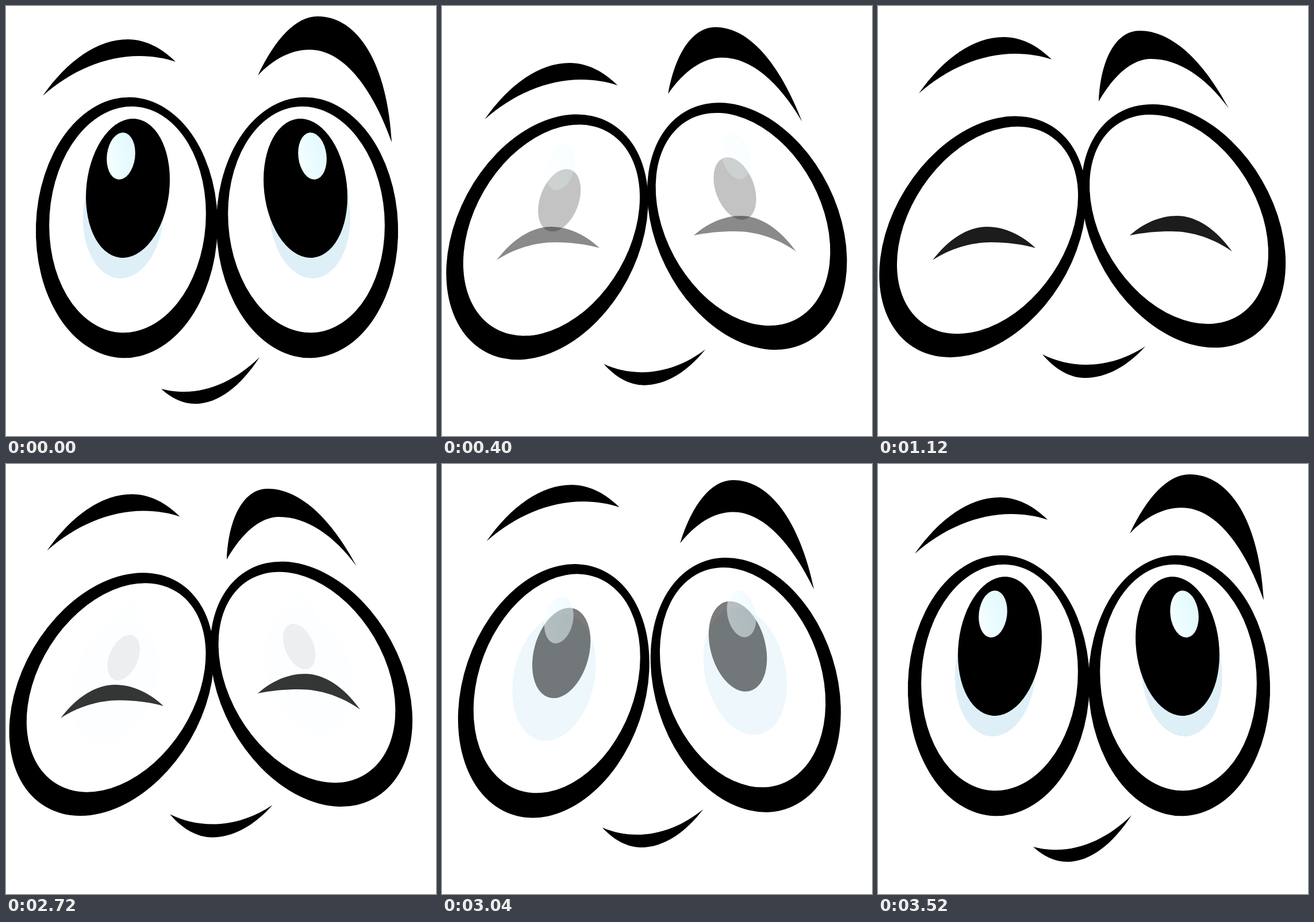
Recreate the animation shown at these times as an HTML page with a canvas. Size 748 px wide and 748 px high, loop 4 s.

```html
<!DOCTYPE html>
<html lang="en">
<head>
<meta charset="utf-8">
<title>Cartoon face</title>
<style>
  html, body { margin: 0; width: 100%; height: 100%; overflow: hidden; background: #fff; }
  canvas { display: block; width: 748px; height: 748px; }
</style>
</head>
<body>
<canvas id="stage" width="748" height="748"></canvas>
<script>
const ctx = document.getElementById('stage').getContext('2d');
const LOOP = 4000, STEP = 80, REOPEN = 33;
const rad = deg => deg * Math.PI / 180;
const clamp = u => Math.min(1, Math.max(0, u));
const mixAll = (a, b, t) => a.map((v, i) => v + (b[i] - v) * t);
const at = ([x, y, dx, dy], t) => [x + dx * t, y + dy * t];

// Gentle ease: halfway between linear and a sine curve.
function ease(u) {
  u = clamp(u);
  return (u + (1 - Math.cos(Math.PI * u)) / 2) / 2;
}

// Rises to 1 over `close` steps, later falls back over `open` steps.
const blink = (step, close, open, delay = 0) =>
  step < REOPEN ? ease(step / close) : 1 - ease((step - REOPEN - delay) / open);

// Crescents: left tip, upper or outer peak, right tip, inner peak.
const leftBrow = [64, 156, 212, 58, 295, 97, 232, 87];
const browHigh = [438, 121, 542, 18, 671, 237, 528, 76];
const browMid = [393, 153, 475, 37, 626, 201, 487, 90];
const browLow = [384, 166, 455, 43, 610, 178, 475, 92];
const smirk = [270, 666, 329, 692, 441, 611, 310, 671];
const smile = [286, 606, 360, 647, 465, 592, 362, 624];
const lids = [
  [95, 442, 190, 384, 274, 421, 197, 411],
  [438, 399, 520, 365, 616, 427, 510, 392]
];

// Each position is [x, y, dx, dy]: open place, then the shift when closed.
const eyes = [
  { side: 1, turn: 30, ball: [211.5, 371.5, -21, 18.5], pupil: [212, 317, -7.8, 21],
    iris: [204, 362, -16, 17], shine: [200, 261, 6, 19] },
  { side: -1, turn: 28, ball: [522.5, 371.5, 1, -.5], pupil: [521, 317, -11.5, .5],
    iris: [528.5, 362, -2, -2], shine: [533, 261, -21.5, 0] }
];

// Handles between a tip and a level peak; steep arcs become rounder.
function handles(tx, ty, px, py) {
  const dx = px - tx, dy = py - ty;
  const steep = Math.max(0, Math.abs(dy / dx) - 1);
  return [tx + dx * (.29 - .33 * steep), ty + dy * .62, px - dx * (.36 + .27 * steep), py];
}

function crescent([ax, ay, px, py, bx, by, qx, qy]) {
  ctx.beginPath();
  ctx.moveTo(ax, ay);
  for (const [x, y, fromX, fromY, toX, toY] of [[px, py, ax, ay, bx, by], [qx, qy, bx, by, ax, ay]]) {
    const [a, b, c, d] = handles(fromX, fromY, x, y);
    const [e, f, g, h] = handles(toX, toY, x, y);
    ctx.bezierCurveTo(a, b, c, d, x, y);
    ctx.bezierCurveTo(g, h, e, f, toX, toY);
  }
  ctx.fill();
}

function oval([x, y], rx, ry, deg, fill) {
  ctx.fillStyle = fill;
  ctx.beginPath();
  ctx.ellipse(x, y, rx, ry, rad(deg), 0, 2 * Math.PI);
  ctx.fill();
}

function drawRim({ side, turn, ball }, drift, tilt) {
  const a = rad(side * turn * tilt), ox = -1.5 * side, oy = 14;
  const [x, y] = at(ball, drift);
  const center = [x + ox * Math.cos(a) - oy * Math.sin(a), y + ox * Math.sin(a) + oy * Math.cos(a)];
  oval(center, 158, 226.8, side * (2 + turn * tilt), '#000');
}

function drawEye({ side, turn, ball, iris, pupil, shine }, drift, tilt, shut) {
  const size = 1 - .7 * shut;
  oval(at(ball, drift), 136, 197, side * (3.9 + turn * tilt), '#fff');
  ctx.globalAlpha = 1 - Math.max(shut, drift === 1 ? 1 : 0);
  oval(at(iris, drift), 70, 112, side * (4 + 16 * tilt), '#deeff8');
  ctx.globalAlpha = 1 - shut;
  oval(at(pupil, drift), 72.1 * size, 121.5 * size, side * (6.6 + 18 * shut), '#000');
  const [x, y] = at(shine, drift);
  const glow = ctx.createLinearGradient(x - 25, y + 6, x + 25, y - 6);
  glow.addColorStop(0, '#f6ffff');
  glow.addColorStop(.5, '#e9fcff');
  glow.addColorStop(1, '#e4f7fb');
  oval([x, y], 24.5, 41, side * (7 + 9 * tilt), glow);
  ctx.globalAlpha = 1;
}

// The left brow dips while closing and hops while opening.
function leftBrowShift(step) {
  if (step < REOPEN) {
    const u = clamp(step / 14), dip = Math.sin(Math.PI * u);
    return [7 * ease(u) + 9 * dip, -4 * ease(u) + 47 * dip];
  }
  const u = clamp((step - REOPEN) / 11), hop = Math.sin(Math.PI * u ** 1.6);
  return [7 * (1 - ease(u)) + 12.4 * hop, -4 * (1 - ease(u)) - 25 * hop];
}

function draw(step) {
  const drift = blink(step, 5, 11), tilt = blink(step, 6.1, 11);
  const shut = blink(step, 7, 9.75), drop = blink(step, 7, 7, 1);
  const lid = step < REOPEN ? (step - 2) / 5.8 : (38 - step) / 4.5;
  ctx.fillStyle = '#fff';
  ctx.fillRect(0, 0, 748, 748);

  eyes.forEach(e => drawRim(e, drift, tilt));
  eyes.forEach(e => drawEye(e, drift, tilt, shut));

  ctx.fillStyle = '#000';
  ctx.globalAlpha = .89 * clamp(lid);
  lids.forEach(crescent);
  ctx.globalAlpha = 1;

  const [dx, dy] = leftBrowShift(step), mid = .77;
  crescent(leftBrow.map((v, i) => v + (i % 2 ? dy : dx)));
  crescent(drop < mid ? mixAll(browHigh, browMid, drop / mid)
                      : mixAll(browMid, browLow, (drop - mid) / (1 - mid)));
  crescent(mixAll(smirk, smile, blink(step, 7.4, 11)));
}

const start = performance.now();
function tick() {
  draw(Math.floor(((performance.now() - start) % LOOP) / STEP));
  requestAnimationFrame(tick);
}
tick();
</script>
</body>
</html>
```
